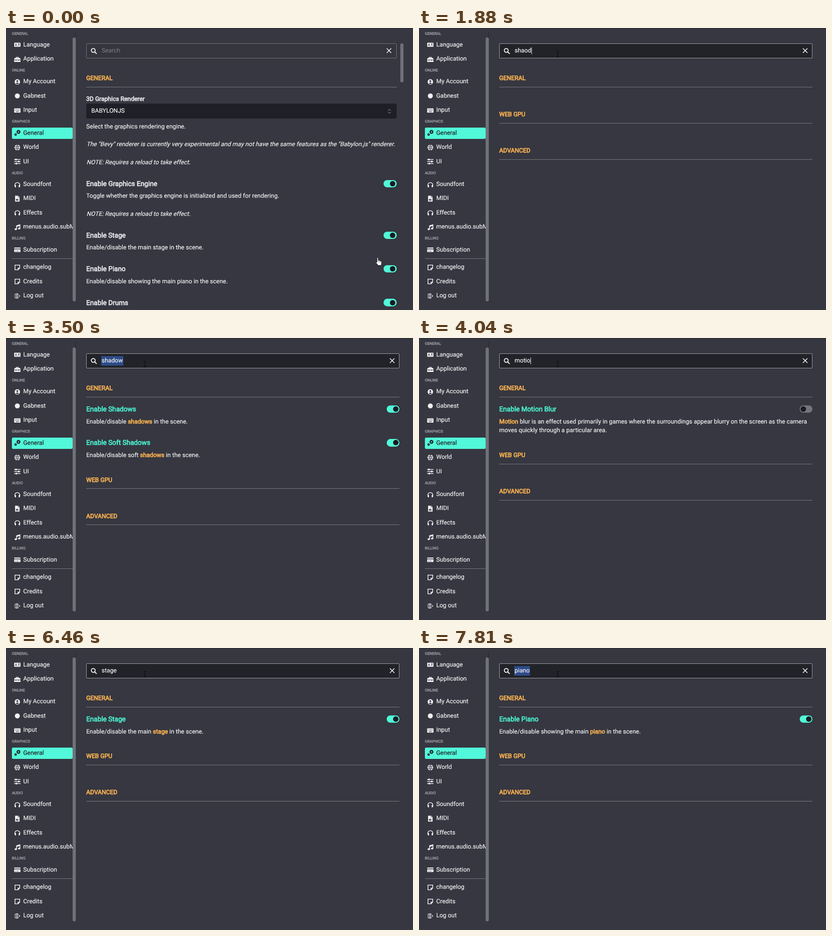
Animation of 898x623 px, one loop 8 s. Source, as an HTML page:

```html
<!DOCTYPE html>
<html lang="en">
<head>
<meta charset="utf-8">
<title>Settings search</title>
<style>
html, body { margin: 0; width: 100%; height: 100%; overflow: hidden; background: #363740; }
body { position: relative; font: 13.4px/20px Roboto, sans-serif; color: #f2f2f4; text-rendering: geometricPrecision; -webkit-text-stroke: .2px currentColor; }
div, svg { position: absolute; white-space: pre; box-sizing: border-box; }
.bold, b { font-weight: 400; -webkit-text-stroke: .75px currentColor; }
.title { font-size: 15px; color: #e9e9ee; margin-top: -1px; }
.small { font-size: 13.4px; margin-top: 0; }
.hit { color: #4cf3d2; }
b, .section { color: #ffb552; }
.head { font-size: 8.3px; color: #a5a6ad; margin-top: -1px; -webkit-text-stroke-width: .35px; }
.note { transform: skewX(-14deg); transform-origin: 0 15px; }
.line { height: 1px; background: #7b7c83; }
.bar { background: #6f7179; border-radius: 4px; }
#side { left: 0; top: 0; width: 147px; height: 623px; overflow: hidden; }
#main, #page { left: 0; top: 0; width: 898px; height: 623px; overflow: hidden; }
.active { left: 12.5px; top: 219.5px; width: 134px; height: 25px; border-radius: 3px; background: #51f8d9; }
.dark { color: #202128; }
.search { left: 177px; top: 34px; height: 33px; border: 1px solid #75767d; border-radius: 2px; background: #34353d; }
.focus { background: #212328; border-color: #a6a7ab; }
.hint { color: #74757d; }
.sel { background: #2d4b88; padding: 3px 1px; margin: 0 -1px; }
.caret { box-shadow: 1px 0 #f2f2f4; }
.select { left: 177px; height: 33px; border-radius: 3px; background: #1f1f27; }
.toggle { width: 28.5px; height: 16.5px; border-radius: 9px; background: #51f8d9; }
.toggle::after { content: ""; position: absolute; right: 2.5px; top: 2.25px; width: 12px; height: 12px; border-radius: 50%; background: #1a1b21; }
.off { background: #73747c; }
.off::after { right: 14px; }
</style>
</head>
<body>
<div id="page">
  <div style="left:0;top:0;width:898px;height:2px;background:#2e2f34"></div>
  <div style="left:153px;top:8px;width:1px;height:14px;background:#26272c"></div>
  <div id="side"></div>
  <div class="bar" style="left:146.5px;top:21px;width:7px;height:583px"></div>
  <div id="main"></div>
  <svg id="hand" width="16" height="20" viewBox="0 0 16 20"><path d="M4 1.5Q5.700 .5 6.200 2.500V7.500Q7.800 6.500 8.600 8Q10 7.200 11 8.700Q13.500 8 13.700 10.500V14Q13.500 17 12 18.500H6Q4.500 16 1.300 12.500Q.6 10.500 3.500 11.500V2.500Z" fill="#fff" stroke="#17181c"/><path d="M6.200 8v3.500M8.700 8.500V12M11.200 9V12" stroke="#444" stroke-width=".7"/></svg>
  <svg id="beam" width="8" height="14" viewBox="0 0 8 14"><path d="M1 .5Q4 .5 4 2.500V11.500Q4 13.500 1 13.500M7 .5Q4 .5 4 2.500M4 11.500Q4 13.500 7 13.500" fill="none" stroke="#08090b"/></svg>
</div>
<script>
const $ = id => document.getElementById(id);
const box = (cls, style, html = '') => `<div class="${cls}" style="${style}">${html}</div>`;
const text = (x, y, html, cls = '') => box(cls, `left:${x}px;top:${y - 9}px`, html);
const rule = (x, y, w) => box('line', `left:${x}px;top:${y}px;width:${w}px`);

// Icons on a 14 x 14 grid; c is the icon colour, k the cut-out colour.
const headphones = '<path d="M1.500 10V8a5.500 5.500 0 0 1 11 0v2" fill="none" stroke="c" stroke-width="1.5"/><path d="M1 8h3v5H3Q1 13 1 11zM13 8h-3v5h1q2 0 2-2z"/>';
const note = '<path d="M1.800 1.800h10.400v6.700l-3.700 3.700H1.800zM12 8.500H8.500V12" fill="none" stroke="c" stroke-width="1.600"/>';
const icons = {
  language: '<rect y="2.500" width="14" height="9" rx="1"/><path d="M2 9.500 4 4.500l2 5M2.800 8h2.400M8.500 5h4M10.500 4v1q0 3-2 4.500M9.500 6.500l3 3" fill="none" stroke="k" stroke-width=".9"/>',
  tools: '<path d="M4 4V2h6v2h2l2 2v2H0V6l2-2zM5.300 4h3.400V3.200H5.300zM0 9h3v1h2V9h4v1h2V9h3v4H0z" fill-rule="evenodd"/>',
  user: '<circle cx="7" cy="7" r="6"/><circle cx="7" cy="5.300" r="2" fill="k"/><path d="M3.500 10.500Q7 6.500 10.500 10.500Q7 13 3.500 10.500" fill="k"/>',
  chat: '<circle cx="7" cy="7" r="5.500"/>',
  keyboard: '<rect y="2.500" width="14" height="9.500" rx="1"/><path d="M2 5h10M2 7.300h10" stroke="k" stroke-width="1.100" stroke-dasharray="1.200 1"/><path d="M4 9.800h6" stroke="k" stroke-width="1.100"/>',
  gears: '<g fill="none" stroke="c"><circle cx="9.500" cy="4.500" r="2.700" stroke-width="2.400"/><circle cx="9.500" cy="4.500" r="4" stroke-dasharray="1.500 1.600"/><circle cx="3.200" cy="10.300" r="1.700" stroke-width="1.900"/></g>',
  globe: '<circle cx="7" cy="7" r="6.300"/><path d="M.7 5h12.600M.7 9h12.600M7 .7v12.600M7 .7Q1.500 7 7 13.300Q12.500 7 7 .7" fill="none" stroke="k" stroke-width=".9"/>',
  sliders: '<path d="M0 2.500h14M0 7h14M0 11.500h14" stroke="c" stroke-width="1.400"/><circle cx="4" cy="2.500" r="2"/><circle cx="10" cy="7" r="2"/><circle cx="5" cy="11.500" r="2"/>',
  headphones,
  file: '<path d="M2 .5h6.500V4H12v9.500H2zM9.300.5 12 3.300H9.300z"/><path d="M4 8.500h1.500l2-1.500v5l-2-1.500H4zM9 7.500q1.500 2 0 4" fill="k" stroke="k" stroke-width=".5"/>',
  music: '<path d="M4.500 3.200 13.500.5v9.500h-1.700V4.500L6.200 6.200v5.500H4.500z"/><ellipse cx="3.600" cy="11.600" rx="2.700" ry="2"/><ellipse cx="11" cy="10" rx="2.600" ry="2"/>',
  card: '<rect y="2" width="14" height="10" rx="1.200"/><path d="M0 5.200h14" stroke="k" stroke-width="1.700"/><path d="M2 9.700h2.500M5.500 9.700h4" stroke="k" stroke-width=".9"/>',
  note,
  exit: '<path d="M6 2.500H2v9h4M7 1.500v11l-2-.8V2.300zM7 2.500h2v2.500M9 9v2.500H7M8.500 7H13M11 5l2 2-2 2" fill="none" stroke="c"/>'
};
const icon = (name, y, c, k) =>
  `<svg style="left:18px;top:${y - 6.5}px" width="14" height="14" viewBox="0 0 14 14" fill="${c}">${icons[name].replace(/"c"/g, `"${c}"`).replace(/"k"/g, `"${k}"`)}</svg>`;

const menu = [
  [12.5, 'GENERAL'], [36.7, 'Language', 'language'], [68.2, 'Application', 'tools'],
  [94, 'ONLINE'], [118.4, 'My Account', 'user'], [149.9, 'Gabnest', 'chat'], [181.4, 'Input', 'keyboard'],
  [207.3, 'GRAPHICS'], [231.8, 'General', 'gears'], [263.2, 'World', 'globe'], [294.6, 'UI', 'sliders'],
  [320.5, 'AUDIO'], [345, 'Soundfont', 'headphones'], [376.4, 'MIDI', 'file'], [407.9, 'Effects', 'headphones'],
  [439.3, 'menus.audio.subMenu', 'music'],
  [465, 'BILLING'], [489.6, 'Subscription', 'card'],
  [528.4, 'changelog', 'note'], [559.9, 'Credits', 'note'], [591.3, 'Log out', 'exit']
];
$('side').innerHTML = box('active', '') + rule(13, 509, 134) + menu.map(([y, label, pic]) => {
  if (!pic) return text(13, y, label, 'head bold');
  const on = label === 'General';
  return icon(pic, y, on ? '#202128' : '#f0f0f2', on ? '#51f8d9' : '#363740') + text(38, y, label, on ? 'dark' : '');
}).join('');

const reload = '_NOTE: Requires a reload to take effect.';
const settings = [
  { name: '3D Graphics Renderer', select: 'BABYLONJS', lines: ['Select the graphics rendering engine.', '',
    '_The "Bevy" renderer is currently very experimental and may not have the same features as the "Babylon.js" renderer.', '', reload] },
  { name: 'Enable Graphics Engine', lines: ['Toggle whether the graphics engine is initialized and used for rendering.', '', reload] },
  { name: 'Enable Stage', lines: ['Enable/disable the main stage in the scene.'] },
  { name: 'Enable Piano', lines: ['Enable/disable showing the main piano in the scene.'] },
  { name: 'Enable Drums', lines: ['Enable/disable showing the drums in the scene.'] },
  { name: 'Enable Shadows', lines: ['Enable/disable shadows in the scene.'] },
  { name: 'Enable Soft Shadows', lines: ['Enable/disable soft shadows in the scene.'] },
  { name: 'Enable Motion Blur', off: true, lines: [
    'Motion blur is an effect used primarily in games where the surroundings appear blurry on the screen as the camera',
    'moves quickly through a particular area.'] }
];
const lineH = 19.8, itemH = 74.4;

function drawItem(item, y, right, query) {
  const mark = s => query ? s.replace(/\w+/g, w => w.toLowerCase().includes(query) ? `<b>${w}</b>` : w) : s;
  let out = text(177, y, item.name, `bold title ${item.select ? 'small' : ''} ${query ? 'hit' : ''}`);
  let descY = y + 27.5;
  if (item.select) {
    out += box('select', `top:${y + 10}px;width:${right - 177}px`) + text(188, y + 26.3, item.select) +
      `<svg style="left:${right - 20}px;top:${y + 21}px" width="8" height="12" fill="none" stroke="#b9bac0"><path d="M1 4.500l3-3 3 3M1 7.500l3 3 3-3"/></svg>`;
    descY += 33.2;
  } else out += box('toggle' + (item.off ? ' off' : ''), `left:${right - 28.5}px;top:${y - 8.25}px`);
  item.lines.forEach((s, i) => {
    const slanted = s[0] === '_';
    out += text(177, descY + i * lineH, mark(slanted ? s.slice(1) : s), slanted ? 'note' : '');
  });
  return out;
}

const heightOf = item => itemH + lineH * (item.lines.length - 1) + (item.select ? 33.2 : 0);

function drawMain(query, state, focus) {
  const items = settings.filter(s => (s.name + s.lines.join(' ')).toLowerCase().includes(query));
  const end = 157 + items.reduce((sum, s) => sum + heightOf(s), 0);
  const next = items.length ? end + 7.7 : 191;
  const long = next + 100 > 623;
  const right = long ? 861.5 : 868;
  let out = box('search' + (focus ? ' focus' : ''), `width:${right - 177}px`) +
    '<svg style="left:187px;top:44px" width="14" height="14" fill="none" stroke="#f5f5f7" stroke-width="2"><circle cx="5.500" cy="5.500" r="4.200"/><path d="M8.700 8.700 13 13"/></svg>' +
    `<svg style="left:${right - 22.5}px;top:44px" width="12" height="12" stroke="#f5f5f7" stroke-width="1.700"><path d="M1 1l10 10M11 1l-10 10"/></svg>` +
    text(211, 50, query || state ? `<span class="${state}">${query}</span>` : 'Search', query || state ? '' : 'hint');
  const section = (name, y) => { out += text(177, y, name, 'bold section') + rule(177, Math.round(y + 18.8), right - 177); };
  section('GENERAL', 111);
  let y = 157;
  for (const item of items) {
    out += drawItem(item, y, right, query);
    y += heightOf(item);
  }
  section('WEB GPU', next);
  section('ADVANCED', next + 80);
  if (long) out += box('bar', `left:869.5px;top:34px;width:7px;height:${86 * settings.length / items.length}px`);
  $('main').innerHTML = out;
}

// One entry per step: "|" shows the caret, "*" selects the text.
const steps = ',,,|,s|,sh|,sha|,shaod|,shaod|,sha|,shad|,shado|,shadow|,shadow*,m|,motio|,motion|,motion,motion|,motion*,s|,st|,sta|,stage|,stage,stage*,p|,pian|,piano|,piano*'.split(',');
const place = (el, x, y, show) => { el.style.cssText = `left:${x}px;top:${y}px;visibility:${show ? 'visible' : 'hidden'}`; };
let shown = -1;

function frame(now) {
  const step = Math.min(steps.length - 1, Math.floor((now % 8000 + 5) / 269.1));
  if (step !== shown) {
    shown = step;
    const s = steps[step];
    drawMain(s.replace(/[|*]/, ''), s.endsWith('|') ? 'caret' : s.endsWith('*') ? 'sel' : '', step > 2);
    const p = Math.min(1, step / 2);
    place($('hand'), 815 - 513 * p, 506 - 455 * p, p < 1);
    place($('beam'), 302, 51, p === 1);
  }
  requestAnimationFrame(frame);
}
frame(0);
</script>
</body>
</html>
```
